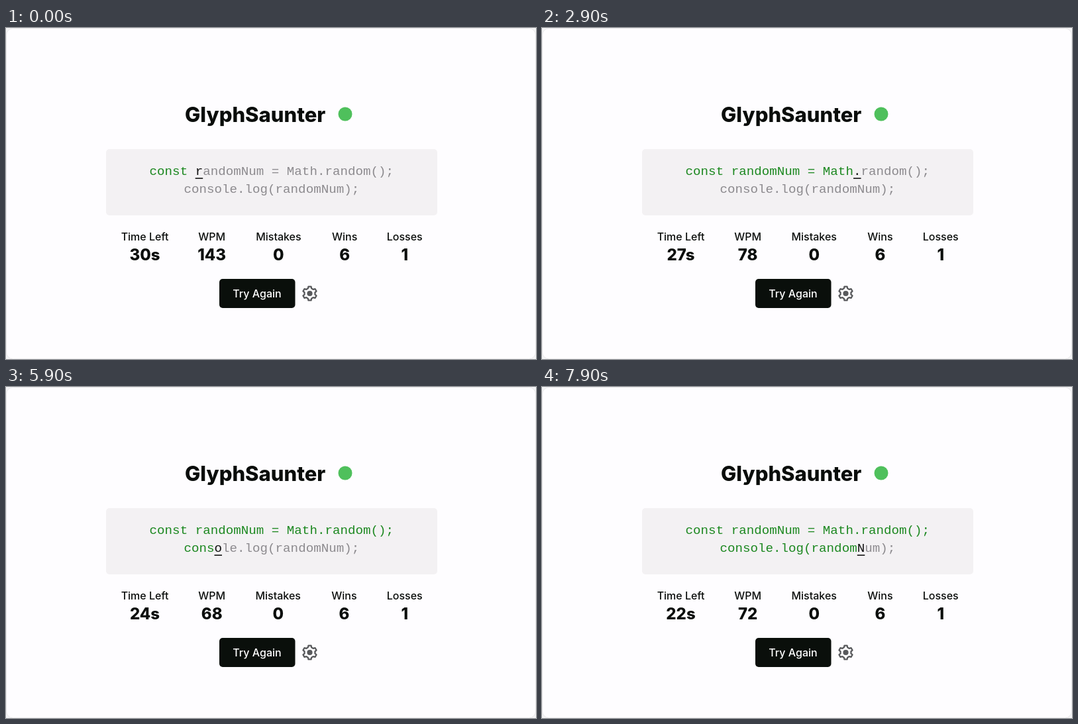
Write an HTML page that moves like this. It is 800 by 500 pixels and loops after 8 s.

```html
<!DOCTYPE html>
<html lang="en">
<head>
<meta charset="utf-8">
<title>Typing game</title>
<style>
  html, body { margin: 0; width: 100%; height: 100%; overflow: hidden; background: #f5f5f6; }
  svg { display: block; width: 800px; height: 500px; font-family: Inter, sans-serif; }
  text { white-space: pre; }
  .title { font-size: 31px; font-weight: 800; fill: #0a0d0b; }
  .label { font-size: 16px; font-weight: 500; fill: #0b0e0c; text-anchor: middle; }
  .value { font-size: 24px; font-weight: 800; fill: #0b0e0c; text-anchor: middle; }
  .code { font: 19.2px "Liberation Mono", "Courier New", monospace; }
  .done { fill: #1c8820; }
  .now { fill: #111; }
  .rest { fill: #8c8a8e; }
</style>
</head>
<body>
<svg id="stage" viewBox="0 0 800 500">
  <rect x=".5" y=".5" width="799" height="499.5" rx="10" fill="#fefdff" stroke="#e9e8ea"/>
  <text class="title" x="270" y="142">GlyphSaunter</text>
  <circle cx="512" cy="130" r="10.5" fill="#4fc05c"/>
  <rect x="151" y="183" width="500" height="100" rx="5" fill="#f3f1f3"/>
  <g id="code"></g>
  <rect id="caret" width="11.5" height="1.6" fill="#111"/>
  <g id="stats"></g>
  <rect x="322" y="379" width="114.5" height="44" rx="5" fill="#0a0f0b"/>
  <text class="label" x="379" y="406.5" style="fill:#fff">Try Again</text>
  <g transform="translate(458.5 401)">
    <path id="gear" fill="none" stroke="#58595c" stroke-width="2.3" stroke-linejoin="round"/>
    <circle r="4.1" fill="#58595c"/>
  </g>
</svg>
<script>
const LOOP = 8000, STEP = 100;
const CHAR = 19.2 * 0.6, CENTER = 400.9;
const START = -680;   // typing began just before the loop
const FIRST = 6;      // characters already typed at time 0

// Moment of each keystroke, beginning with character FIRST.
const KEYS = [
  -177, 60, 160, 310, 390, 610, 690, 790, 1160, 1290,
  1695, 1790, 1960, 2290, 2560, 2650, 2710, 2960,
  3170, 3260, 3360, 3480, 3570, 3700, 4100, 4400, 4700, 5190,
  5380, 5540, 5680, 5830, 5960, 6110, 6270, 6440, 6590,
  6760, 6920, 7060, 7200, 7320, 7450, 7570, 7690, 7850
];

const $ = id => document.getElementById(id);

function add(parent, tag, attrs = {}, text = "") {
  const el = document.createElementNS("http://www.w3.org/2000/svg", tag);
  for (const name in attrs) el.setAttribute(name, attrs[name]);
  el.textContent = text;
  return parent.appendChild(el);
}

let offset = 0;
const lines = ["const randomNum = Math.random();", "console.log(randomNum);"].map((text, row) => {
  const x = CENTER - text.length * CHAR / 2;
  const el = add($("code"), "text", { class: "code", x, y: 222 + row * 27 });
  const spans = ["done", "now", "rest"].map(name => add(el, "tspan", { class: name }));
  const line = { text, x, y: 226.3 + row * 27, offset, spans };
  offset += text.length + 1;
  return line;
});

const stats = [
  ["Time Left", 209.5, "30s"], ["WPM", 310.7, "143"], ["Mistakes", 410.7, "0"],
  ["Wins", 510.4, "6"], ["Losses", 601.7, "1"]
].map(([name, x, value]) => {
  const group = add($("stats"), "g");
  add(group, "text", { class: "label", x, y: 320.5 }, name);
  return { group, value: add(group, "text", { class: "value", x, y: 351 }, value) };
});

function gearPath() {
  const points = [];
  for (let tooth = 0; tooth < 6; tooth++) {
    for (const [angle, r] of [[-19, 8.1], [-11, 10.6], [11, 10.6], [19, 8.1]]) {
      const a = (tooth * 60 + angle - 90) * Math.PI / 180;
      points.push((r * Math.cos(a)).toFixed(2) + " " + (r * Math.sin(a)).toFixed(2));
    }
  }
  return "M" + points.join("L") + "Z";
}
$("gear").setAttribute("d", gearPath());

function draw(t) {
  const now = Math.floor(t / STEP) * STEP;
  const last = Math.max(0, KEYS.filter(key => key <= now).length - 1);
  const typed = FIRST + last;

  let caret = null;
  for (const line of lines) {
    const pos = typed - line.offset;
    const active = pos >= 0 && pos < line.text.length;
    const from = Math.max(0, pos), to = from + (active ? 1 : 0);
    const parts = [line.text.slice(0, from), line.text.slice(from, to), line.text.slice(to)];
    parts.forEach((part, i) => { line.spans[i].textContent = part; });
    if (active) caret = [line.x + pos * CHAR, line.y];
  }
  $("caret").style.display = caret ? "" : "none";
  if (caret) {
    $("caret").setAttribute("x", caret[0]);
    $("caret").setAttribute("y", caret[1]);
  }

  const wpm = Math.round(typed * 12000 / (KEYS[last] - START));
  stats[0].value.textContent = 30 - Math.floor((now + 600) / 1000) + "s";
  stats[1].value.textContent = wpm;
  // A three-digit speed pushes its neighbours aside a little.
  const shift = wpm > 99 ? 0.7 : 0;
  for (const stat of stats.slice(2, 4)) stat.group.setAttribute("transform", `translate(${shift} 0)`);
}

const begin = performance.now();
function tick() {
  draw((performance.now() - begin) % LOOP);
  requestAnimationFrame(tick);
}
tick();
</script>
</body>
</html>
```
